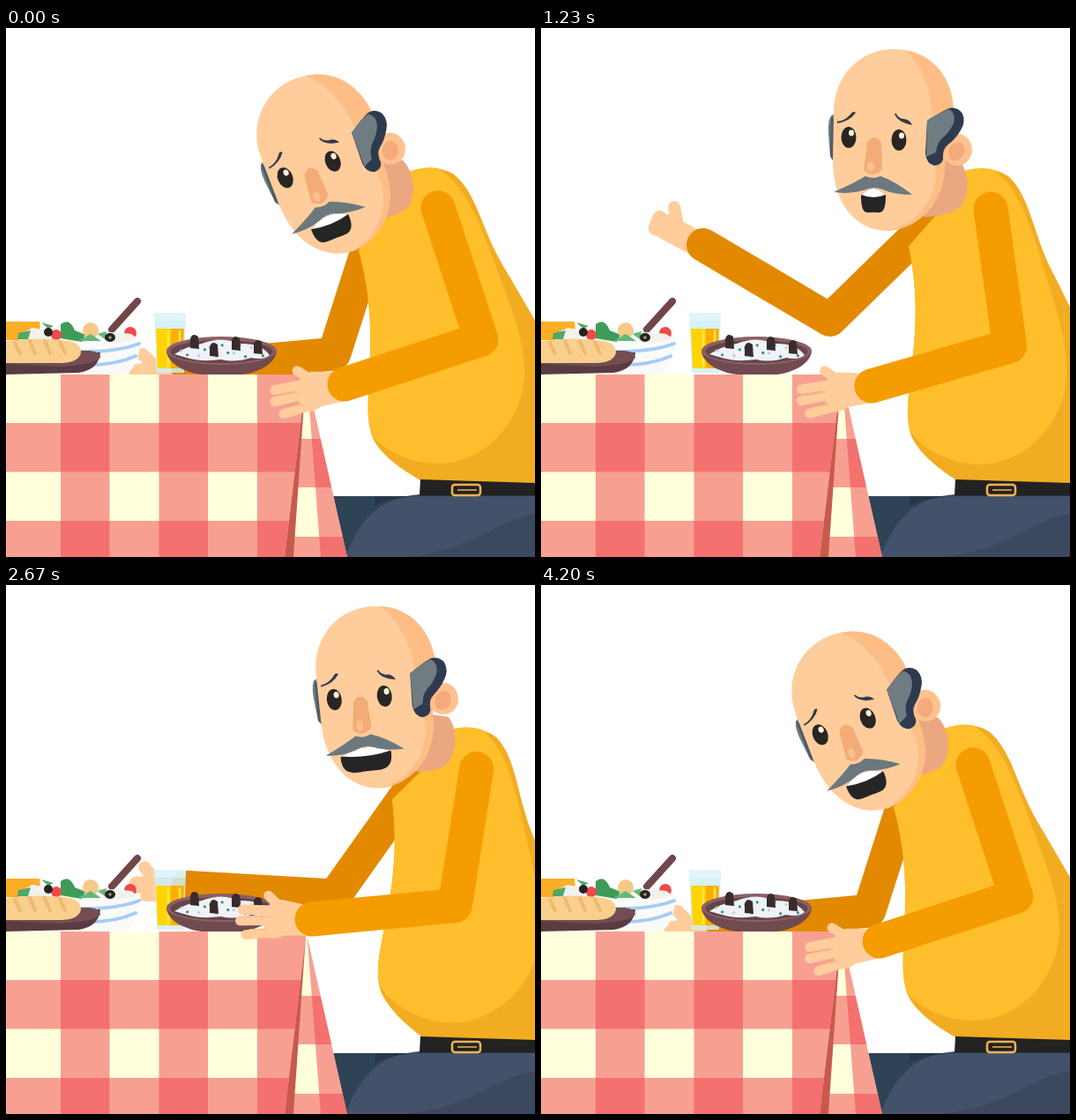
An HTML page that plays this animation: 600x600 px, repeating every 4.23 s.

```html
<!DOCTYPE html>
<html lang="en">
<head>
<meta charset="utf-8">
<title>At the table</title>
<style>
  html, body { margin: 0; width: 100%; height: 100%; overflow: hidden; background: #fff; }
  svg { display: block; width: 100vw; height: 100vh; }
  .line { fill: none; stroke-linecap: round; stroke-linejoin: round; }
</style>
</head>
<body>
<svg viewBox="0 0 600 600">
  <defs>
    <clipPath id="frontClip"><path d="M0 393H341L316 600H0Z"/></clipPath>
    <clipPath id="sideClip"><path d="M341 396L387 600H324L337 432Z"/></clipPath>
    <clipPath id="mouthClip"><path id="mouthShape"/></clipPath>
  </defs>

  <g id="farHand">
    <g id="spoon" fill="#636766" stroke="#636766">
      <path class="line" d="M-52 32L-60 -30" stroke-width="8"/>
      <ellipse cx="-63" cy="-46" rx="9" ry="19" transform="rotate(-9 -63 -46)"/>
    </g>
    <g class="line" stroke="#ffcd9b">
      <path d="M-47 4L0 2" stroke-width="29"/>
      <path d="M-34 -2L-50 -20" stroke-width="14"/>
      <path d="M-58 -1L-56 11" stroke-width="17"/>
    </g>
  </g>
  <path id="farArm" class="line" stroke="#e38900" stroke-width="38"/>

  <g id="torso">
    <path fill="#f2ac22" d="M450 166Q485 152 508 166C535 188 540 232 567 275L640 400V518L472 514C452 503 425 485 416 465C408 445 411 420 412 390C415 340 413 300 400 252L440 200Z"/>
    <path fill="#ffbe2b" d="M450 166Q470 156 490 159C518 178 530 205 548 250C570 310 589 350 588 395C585 445 545 494 490 494C460 494 430 480 416 463C408 445 411 420 412 390C415 340 413 300 400 252L440 200Z"/>
    <path fill="#eba880" d="M410 150H450C465 165 466 196 452 207Q440 215 415 218Z"/>
  </g>

  <g id="head">
    <path fill="#6f7c82" d="M-68 6Q-75 8 -74 28L-72 54L-66 62Z"/>
    <path fill="#2f3a4e" d="M-71 7L-67 12V62L-72 52Z" opacity=".5"/>
    <ellipse cx="72" cy="46" rx="17" ry="18" fill="#ffc28f"/>
    <ellipse cx="71" cy="48" rx="9" ry="11" fill="#f4ab79" transform="rotate(25 71 48)"/>
    <path fill="#ffcd9b" d="M-68 3C-68 -38 -38 -68 0 -68S68 -38 68 3L58 62C58 108 26 138 -10 138C-45 136 -69 105 -69 58Z"/>
    <path fill="#ffbd86" d="M14 -66.5C40 -40 44 -5 44 20L48 75C46 105 25 132 -10 138C26 138 58 108 58 62L68 3C68 -34 45 -62 14 -66.5Z"/>
    <path fill="#2f3a4e" d="M38 13Q52 4 63 -1Q72 -3 78 5Q82 15 76 24Q70 34 62 40Q55 45 56 57Q54 64 46 64Q37 62 36 50Z"/>
    <path fill="#6f7c82" d="M38 13Q52 4 63 0Q71 5 68 16Q63 27 55 33Q49 39 48 49L37 54Z"/>
    <path fill="#2f3a4e" d="M-64 16Q-50 14 -43 4Q-46 1 -49 6Q-55 13 -64 14ZM1 5Q4 15 21 18Q18 11 10 11Q4 9 3 5Z"/>
    <g class="eye"><ellipse rx="8.5" ry="12" fill="#292522"/><ellipse cx="3" cy="-5" rx="3" ry="3.6" fill="#fff3dc"/></g>
    <g class="eye"><ellipse rx="8.5" ry="12" fill="#292522"/><ellipse cx="3" cy="-5" rx="3" ry="3.6" fill="#fff3dc"/></g>
    <path fill="#f3ab78" d="M-30 38Q-22 26 -14 38L-13 68Q-23 80 -34 69Z"/>
    <ellipse cx="-26" cy="65" rx="4" ry="6" fill="#fcc08f"/>
    <g clip-path="url(#mouthClip)">
      <rect x="-70" y="80" width="100" height="50" fill="#252525"/>
      <path id="teeth" fill="#fff"/>
    </g>
    <path fill="#6b787d" d="M-68 94Q-45 84 -32 76Q-23 80 -15 76Q2 82 21 97Q0 97 -13 91Q-23 87 -34 92Q-50 97 -68 94Z"/>
  </g>

  <path fill="#2f4356" d="M365 531H470V600H365Z"/>
  <path fill="#43516a" d="M600 529H470C425 532 402 555 385 600H600Z"/>
  <path fill="#3c4860" d="M600 551C555 558 535 590 455 600H600Z"/>
  <path fill="#263746" d="M419 531H600V530L470 530Q432 534 418 542Z"/>
  <path fill="#222" d="M470 512L600 516V530L469 530Z"/>
  <rect x="506" y="518" width="32" height="12" rx="3" fill="none" stroke="#efb456" stroke-width="2.5"/>
  <path d="M512 524H534" stroke="#efb456" stroke-width="1.5"/>

  <g id="cloth"></g>
  <path fill="#c75a4c" d="M340 400L337 440L326 600H316Z"/>

  <g id="food">
    <path fill="#fbae26" d="M0 333H38Q41 345 32 354H0Z"/>
    <path class="line" d="M120 342L149 310" stroke="#704649" stroke-width="8"/>
    <g fill="#fafafa">
      <ellipse cx="85" cy="352" rx="68" ry="8" fill="#e8eff2"/>
      <path d="M16 350H153C152 375 145 388 136 393H60Q20 385 16 350Z"/>
    </g>
    <path class="line" stroke="#a4cdf5" stroke-width="4" d="M80 367Q125 368 151 358M95 382Q125 382 147 372"/>
    <g id="salad">
      <path fill="#f1f2ec" d="M14 348L30 340L52 344L60 352L40 355L16 354Z"/>
      <path fill="#50a867" d="M14 346L28 343L25 353H13ZM48 341L40 334L54 338Z"/>
      <path fill="#3f9b58" d="M62 336Q72 328 78 343L90 348L86 356L62 352Z"/>
      <circle cx="96" cy="343" r="9" fill="#f6c989"/>
      <circle cx="141" cy="346" r="7" fill="#ee4b4a"/>
      <circle cx="57" cy="348" r="6" fill="#ee4b4a"/>
      <path fill="#63b977" d="M82 355L96 347L108 355ZM104 347L114 344L112 353Z"/>
      <path fill="#f1f2ec" d="M124 345L142 347L149 352L128 357L112 357Z"/>
      <circle cx="48" cy="345" r="5" fill="#28231f"/>
      <ellipse cx="118" cy="351" rx="6" ry="5" fill="#28231f"/>
      <circle cx="118" cy="351" r="1.8" fill="#9e9a8c"/>
    </g>
    <path fill="#593c42" d="M0 368H107Q105 388 82 391L0 393Z"/>
    <path fill="#744d52" d="M0 366H95Q107 367 107 374Q100 382 60 384L0 381Z"/>
    <path fill="#f8cf8d" d="M0 355Q40 350 72 355Q85 358 85 368Q83 379 64 380H0Z"/>
    <path class="line" stroke="#efb971" stroke-width="4" d="M10 357L16 369M27 355L33 369M44 355L50 369M61 356L67 369"/>

    <path fill="#cdf0fa" opacity=".82" d="M168 323H204L202 391H171Z"/>
    <path fill="#ffd400" d="M170 341H187V386H172Z"/>
    <path fill="#fbae00" d="M187 341H202L200 386H187Z"/>
    <path d="M184 343V385M197 343V385" stroke="#ffe34a" stroke-width="2.5"/>
    <path fill="#e6f8fc" d="M168 323H204V332H168Z" opacity=".6"/>

    <path fill="#714a50" d="M182 367H307C305 382 284 391 268 393H222C205 391 184 382 182 367Z"/>
    <ellipse cx="244.500" cy="366" rx="62.500" ry="16" fill="#8a6064"/>
    <ellipse cx="244.500" cy="367" rx="58" ry="13" fill="#68434a"/>
    <path fill="#eff2f9" d="M191 370Q205 361 222 358Q245 349 264 358Q289 357 299 371Q292 377 278 374Q260 380 244 376Q220 379 205 374Z"/>
    <g id="herbs"></g>
  </g>

  <g id="nearHand">
    <path fill="#ffcd9b" d="M5 -14L-38 -14Q-54 -8 -56 8L-48 31Q-38 34 -26 25L5 18Z"/>
    <g class="line" stroke="#ffcd9b" stroke-width="11">
      <path d="M-36 -4L-54 -15M-45 0L-79 7M-45 12L-79 20M-38 24L-69 34"/>
    </g>
    <path class="line" stroke="#f6b783" stroke-width="1.200" d="M-52 9L-72 13M-48 23L-66 27"/>
  </g>
  <path id="nearArm" class="line" stroke="#f59c00" stroke-width="39"/>
</svg>

<script>
const LOOP = 4230, STEP = 30;
const $ = id => document.getElementById(id);
const eyes = [...document.querySelectorAll('.eye')];

const times = [0, 570, 850, 1230, 1650, 2160, 2250, 2670, 3240, 3570, 3780, 4200];
const tracks = {
  lean:  [0, 1.3, 2.5, 3.7, 3.7, -0.3, 0.9, 8.1, 5.5, 3.7, 3, 0],
  headX: [352, 376, 390, 400, 399, 358, 369, 419, 392, 377, 371, 352],
  headY: [121, 102, 95, 92, 93, 116, 107, 92, 104, 112, 113, 121],
  tilt:  [-22, -6.5, -3, 0, 0, -16, -11.5, -7, -16, -20, -20, -22],
  nearX: [384, 377, 376, 375, 374, 336, 344, 347, 334, 335, 345, 384],
  nearY: [404, 410, 408, 406, 406, 412, 409, 379, 386, 391, 395, 404],
  farX:  [206, 182, 172, 184, 184, 94, 131, 206, 204, 213, 212, 206],
  farY:  [385, 301, 285, 246, 250, 315, 322, 343, 362, 370, 374, 385],
  mouth: [23, 30, 22, 14, 20, 30, 29, 29, 24, 20, 22, 23]
};

// Monotone cubic interpolation: smooth, without overshoot.
function sample(values, t) {
  let i = 0;
  while (i < times.length - 2 && t > times[i + 1]) i++;
  const slope = k => (values[k + 1] - values[k]) / (times[k + 1] - times[k]);
  const tangent = k => {
    if (k === 0 || k === times.length - 1) return 0;
    const a = slope(k - 1), b = slope(k);
    return a * b > 0 ? 2 * a * b / (a + b) : 0;
  };
  const span = times[i + 1] - times[i];
  const u = Math.min(1, (t - times[i]) / span), v = 1 - u;
  return values[i] * (1 + 2 * u) * v * v + values[i + 1] * (3 - 2 * u) * u * u
    + span * u * v * (tangent(i) * v - tangent(i + 1) * u);
}

function rotateAbout([x, y], [px, py], degrees) {
  const a = degrees * Math.PI / 180, c = Math.cos(a), s = Math.sin(a);
  return [px + (x - px) * c - (y - py) * s, py + (x - px) * s + (y - py) * c];
}

// Two-bone arm; returns the elbow and the forearm angle.
function placeArm(arm, hand, shoulder, wrist, upper, fore, restAngle) {
  const dx = wrist[0] - shoulder[0], dy = wrist[1] - shoulder[1];
  const d = Math.min(Math.hypot(dx, dy), upper + fore - 0.5);
  const bend = Math.acos((upper * upper + d * d - fore * fore) / (2 * upper * d));
  const a = Math.atan2(dy, dx) - bend;
  const elbow = [shoulder[0] + upper * Math.cos(a), shoulder[1] + upper * Math.sin(a)];
  const f = Math.atan2(wrist[1] - elbow[1], wrist[0] - elbow[0]);
  const end = [elbow[0] + fore * Math.cos(f), elbow[1] + fore * Math.sin(f)];
  arm.setAttribute('d', `M${shoulder}L${elbow}L${end}`);
  hand.setAttribute('transform', `translate(${end}) rotate(${f * 180 / Math.PI - restAngle})`);
}

function buildCloth() {
  const tint = 'fill="rgba(239,70,77,.51)"';
  const rect = (x, y, w, h) => `<rect x="${x}" y="${y}" width="${w}" height="${h}" ${tint}/>`;
  const base = '<rect y="390" width="400" height="210" fill="#ffffdc"/>';
  let front = base, side = base;
  for (const x of [62, 173.5, 285]) front += rect(x, 393, 55.5, 207);
  for (const y of [448, 559]) front += rect(0, y, 345, 55.5);
  for (const y of [466, 577]) side += rect(310, y, 90, 55);
  side += `<path d="M341 390L357 600H400V390Z" ${tint}/>`;
  $('cloth').innerHTML =
    `<g clip-path="url(#frontClip)">${front}</g><g clip-path="url(#sideClip)">${side}</g>`;
}

function buildHerbs() {
  let out = '';
  for (let i = 0; i < 15; i++) {
    const x = 199 + i * 6.6, y = 366 + 7 * Math.sin(i * 2.4);
    out += `<circle cx="${x}" cy="${y}" r="1.6" fill="${i % 3 ? '#3d8f67' : '#c3cbdc'}"/>`;
  }
  for (const [x, y] of [[214, 356], [236, 365], [261, 358], [286, 362]])
    out += `<path d="M${x - 5} ${y + 7}V${y - 3}Q${x - 3} ${y - 11} ${x + 4} ${y - 6}L${x + 5} ${y + 8}Z" fill="#382c2a"/>`;
  $('herbs').innerHTML = out;
}

function draw(t) {
  const p = {};
  for (const name in tracks) p[name] = sample(tracks[name], t);

  const pivot = [480, 515];
  const shoulder = rotateAbout([490, 204], pivot, p.lean);
  $('torso').setAttribute('transform', `rotate(${p.lean} ${pivot})`);
  $('head').setAttribute('transform', `translate(${p.headX} ${p.headY}) rotate(${p.tilt})`);

  placeArm($('nearArm'), $('nearHand'), shoulder, [p.nearX, p.nearY], 157, 163, 161.6);
  placeArm($('farArm'), $('farHand'), [shoulder[0] - 70, shoulder[1] + 16],
    [p.farX, p.farY], 157, 167, 180);
  $('spoon').setAttribute('visibility', t > 240 && t < 1110 ? 'visible' : 'hidden');

  const open = 1 - 0.52 * Math.max(0, 1 - Math.abs(t - 570) / 120);
  eyes.forEach((eye, i) =>
    eye.setAttribute('transform', `translate(${[-51, 6][i]} ${[32, 35][i]}) scale(1 ${open})`));

  const w = p.mouth, cx = -23;
  const l = cx - w, r = cx + w;
  $('mouthShape').setAttribute('d',
    `M${l} 98Q${cx} 82 ${r} 98C${r} 121 ${cx + w * 0.5} 117 ${cx} 117S${l} 121 ${l} 98Z`);
  $('teeth').setAttribute('d', `M${l} 80H${r}V97Q${cx} 103 ${l} 97Z`);
}

buildCloth();
buildHerbs();
const start = performance.now();
function tick() {
  const t = (performance.now() - start) % LOOP;
  draw(Math.floor(t / STEP) * STEP);
  requestAnimationFrame(tick);
}
draw(0);
requestAnimationFrame(tick);
</script>
</body>
</html>
```
